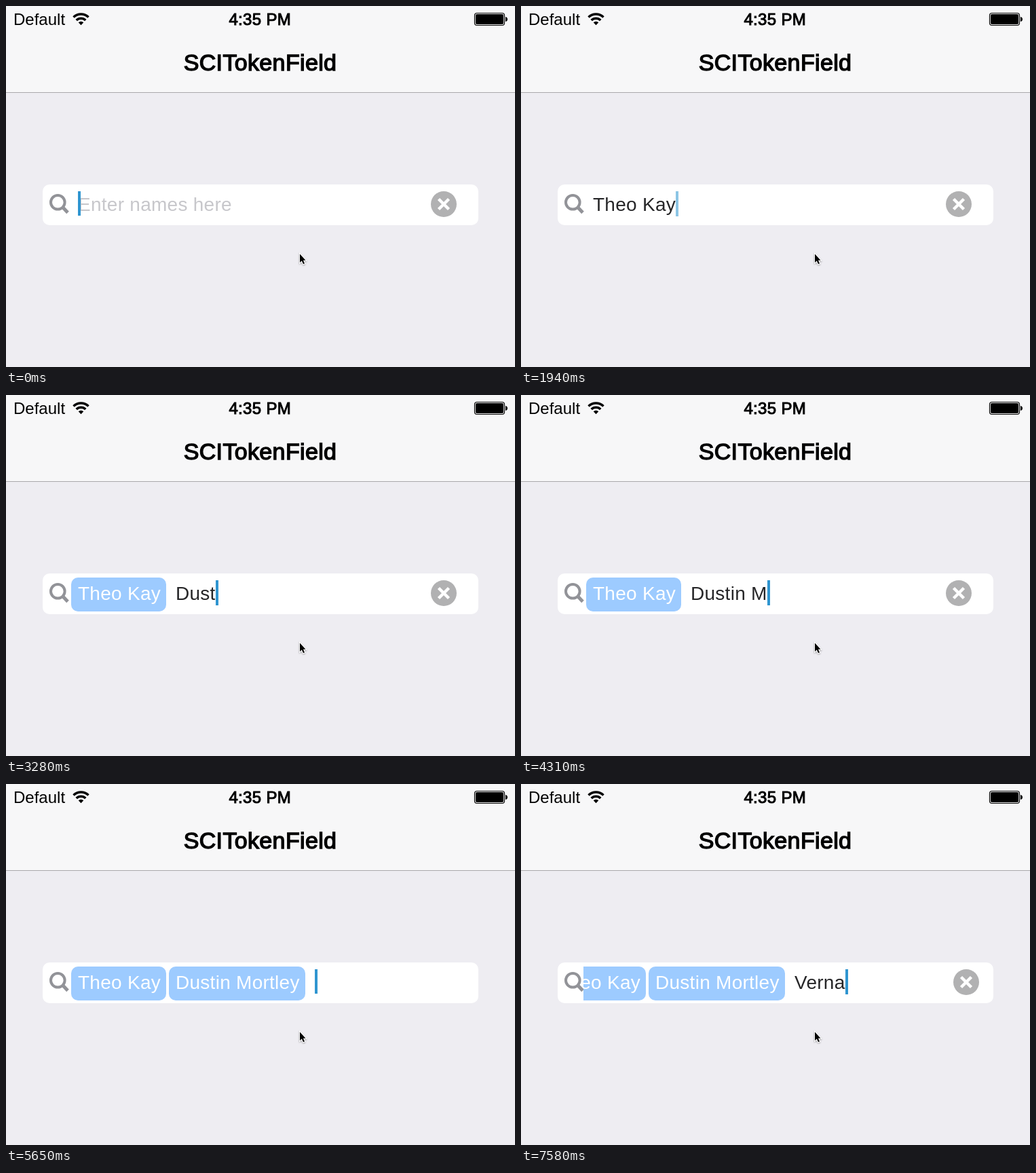
An HTML page that plays this animation: 750 px wide and 532 px high, repeating every 8000 ms.

```html
<!DOCTYPE html>
<html lang="en">
<head>
<meta charset="utf-8">
<title>Token field</title>
<style>
  html, body { margin: 0; width: 100%; height: 100%; overflow: hidden; background: #eeedf2; }
  svg { display: block; width: 750px; height: 532px; }
  text { font: 28px "Liberation Sans", Arial, sans-serif; letter-spacing: .27px; white-space: pre; }
  .status { font-size: 24px; letter-spacing: 0; }
  .medium { text-anchor: middle; stroke: #000; stroke-width: 1; letter-spacing: .35px; }
  .title { font-size: 34px; stroke-width: 1.4; }
  .token rect { fill: #9dcbff; }
  .token text { fill: #fff; }
</style>
</head>
<body>
<svg viewBox="0 0 750 532">
  <defs>
    <clipPath id="fieldClip"><rect x="92" y="263" width="594" height="60"/></clipPath>
    <filter id="shadow" x="-50%" y="-50%" width="200%" height="200%">
      <feDropShadow dx="0" dy="1" stdDeviation="1" flood-opacity=".4"/>
    </filter>
  </defs>
  <rect width="750" height="532" fill="#eeedf2"/>
  <rect width="750" height="127" fill="#f7f7f8"/>
  <rect y="127" width="750" height="1" fill="#a9a9ac"/>

  <text class="status" x="11" y="28">Default</text>
  <g fill="none" stroke="#000" stroke-width="3.5">
    <path d="M99.5 16.5A15.7 15.7 0 0 1 121.5 16.5M103.700 21A9.5 9.5 0 0 1 117.300 21"/>
    <path d="M110.5 28.3L106.7 24.3A5.3 5.3 0 0 1 114.3 24.3Z" fill="#000" stroke="none"/>
  </g>
  <text class="status medium" x="374.3" y="28">4:35 PM</text>
  <rect x="690.5" y="10.5" width="44" height="18" rx="3.5" fill="none" stroke="#000" stroke-width="1.2"/>
  <rect x="692" y="12" width="41" height="15" rx="2" fill="#000"/>
  <path d="M736 16Q739 16.5 739 19.5T736 23Z"/>
  <text class="medium title" x="374.5" y="95">SCITokenField</text>

  <rect x="54" y="263" width="642" height="60" rx="10" fill="#fff"/>
  <g fill="none" stroke="#929398">
    <circle cx="76.3" cy="289.3" r="10.3" stroke-width="4"/>
    <path d="M83.5 296.5L91 304.5" stroke-width="5"/>
  </g>
  <g clip-path="url(#fieldClip)">
    <g id="content">
      <g class="token">
        <rect x="96" y="269" width="140" height="50" rx="10"/>
        <text x="106" y="302"></text>
      </g>
      <g class="token">
        <rect x="240" y="269" width="201" height="50" rx="10"/>
        <text x="250" y="302"></text>
      </g>
      <text id="placeholder" x="106" y="302" fill="#c7c7cb">Enter names here</text>
      <text id="typed" y="302" fill="#262628"></text>
      <rect id="caret" y="273" width="4" fill="#2f95d0"/>
      <g id="clear">
        <circle r="19" fill="#b1b1b2"/>
        <path d="M-7.5-7.5L7.5 7.5M7.5-7.5L-7.5 7.5" stroke="#fff" stroke-width="4.5"/>
      </g>
    </g>
  </g>

  <path d="M433 365.5V378L435.8 375.5L438 380.3L440 379.4L438 374.7H441.5Z"
        stroke="#fff" paint-order="stroke" stroke-width="2" filter="url(#shadow)"/>
</svg>
<script>
  const LOOP = 8000;
  // Each entry is typed from x; keys holds the time of every letter.
  const entries = [
    { start: 0, x: 106, name: 'Theo Kay',
      keys: [150, 300, 450, 750, 900, 1045, 1190, 1340] },
    { start: 2090, x: 250, name: 'Dustin Mortley',
      keys: [2840, 2990, 3130, 3280, 3430, 3720, 4020, 4310, 4610, 4760, 4905, 4905, 5050, 5200] },
    { start: 5650, x: 455, name: 'Verna',
      keys: [6240, 6540, 6840, 7280, 7580] },
  ];
  const caretFades = [[1940, 2090], [2690, 2840]];

  const byId = id => document.getElementById(id);
  const [content, placeholder, typed, caret, clear] =
    ['content', 'placeholder', 'typed', 'caret', 'clear'].map(byId);
  const tokens = [...document.querySelectorAll('.token')];
  tokens.forEach((token, i) => token.querySelector('text').textContent = entries[i].name);

  const show = (el, visible) => el.setAttribute('visibility', visible ? 'visible' : 'hidden');
  const countUntil = (times, t) => times.filter(time => time <= t).length;

  function draw(t) {
    const index = countUntil(entries.map(e => e.start), t) - 1;
    const { x, name, keys } = entries[index];
    const text = name.slice(0, countUntil(keys, t));
    const scroll = [0, 28, 52][countUntil([5800, 5950], t)];
    const faded = caretFades.some(([from, to]) => t >= from && t < to);

    tokens.forEach((token, i) => show(token, i < index));
    show(placeholder, index === 0 && !text);
    typed.textContent = text;
    typed.setAttribute('x', x);
    const width = text ? typed.getComputedTextLength() : 0;
    caret.setAttribute('x', Math.round(x + width));
    caret.setAttribute('height', text ? 37 : 36);
    caret.setAttribute('opacity', faded ? .55 : 1);
    clear.setAttribute('transform', `translate(${index < 2 ? 645 : 708} 292)`);
    content.setAttribute('transform', `translate(${-scroll} 0)`);
  }

  const began = performance.now();
  function tick() {
    draw((performance.now() - began) % LOOP);
    requestAnimationFrame(tick);
  }
  tick();
</script>
</body>
</html>
```
